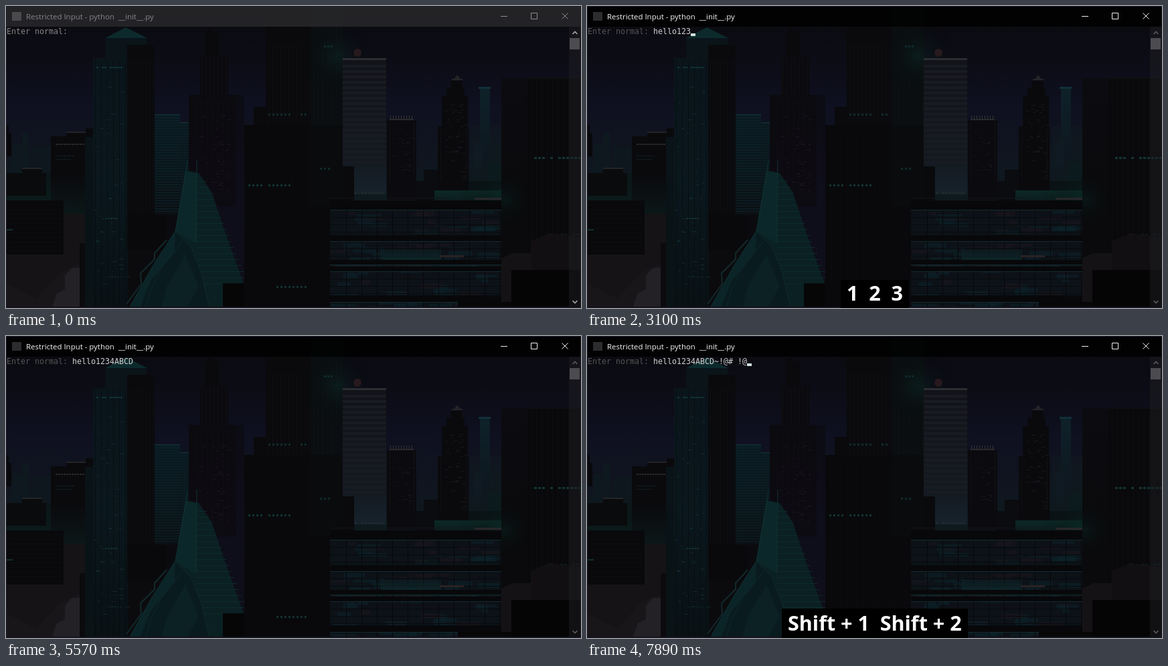
These frames come from a looping animation (859x452 px, 8 s). An HTML page with a canvas:

```html
<!DOCTYPE html>
<html lang="en">
<head>
<meta charset="utf-8">
<title>Restricted Input</title>
<style>
  html, body { margin: 0; width: 859px; height: 452px; overflow: hidden; background: #0b0b0e; }
  #stage { position: relative; width: 859px; height: 452px; overflow: hidden; }
  #stage > * { position: absolute; }
  canvas { left: 0; top: 0; }
  #bar { left: 0; top: 0; width: 859px; height: 31px; background: rgba(45, 45, 48, .72); }
  #title { left: 30px; top: 6px; font: 11.45px/20px "Open Sans", "Noto Sans", sans-serif; color: #858587; white-space: pre; }
  #icon { left: 9px; top: 9px; width: 14px; height: 13px; background: #4a4a4c; }
  svg { left: 0; top: 0; fill: none; }
  #buttons { stroke: #8c8c8e; }
  #arrows { stroke: #a4a4a6; stroke-width: 1.7; }
  #line { left: 1px; top: 31px; font: 11.63px/14px "DejaVu Sans Mono", "Noto Sans Mono", monospace; color: #868686; white-space: pre; }
  #typed { color: #cfcfcf; }
  #cursor { top: 41px; width: 7px; height: 4px; background: #d2e4e2; }
  #keys { bottom: 0; padding: 0 9px; background: #000; color: #fff; font: bold 30.5px "Open Sans", "Noto Sans", sans-serif; white-space: pre; }
  #edge { inset: 0; box-sizing: border-box; border: 1px solid #1c1b2c; border-right-color: #17171c; }
  .focus #bar { background: rgba(0, 0, 0, .8); }
  .focus #title { color: #f4f4f4; }
  .focus #icon { background: #2c2c2e; }
  .focus #buttons { stroke: #f0f0f0; }
  .focus #arrows { stroke: #58585a; }
  .focus #line { color: #555557; }
</style>
</head>
<body>
<div id="stage">
  <canvas id="city" width="859" height="452"></canvas>
  <div id="bar"></div>
  <div id="icon"></div>
  <div id="title">Restricted Input - python  __init__.py</div>
  <svg width="859" height="452">
    <path id="buttons" d="M739 15.5h10M784.5 10.5h9v9h-9zM830.5 10.5l9 9M839.5 10.5l-9 9"/>
    <path fill="#4c4b50" d="M842 48h15v17h-15z"/>
    <path id="arrows" d="M846.5 42l3.5-3.5 3.5 3.5M846.5 441l3.5 3.5 3.5-3.5"/>
  </svg>
  <div id="line">Enter normal: <span id="typed"></span></div>
  <div id="cursor"></div>
  <div id="edge"></div>
  <div id="keys"></div>
</div>
<script>
const $ = id => document.getElementById(id);
const ctx = $('city').getContext('2d');

let seed = 7;
const rnd = () => (seed = seed * 16807 % 2147483647) / 2147483647;

// All shapes take corner coordinates, not sizes.
function box(x0, y0, x1, y1, fill) {
  ctx.fillStyle = fill;
  ctx.fillRect(x0, y0, x1 - x0, y1 - y0);
}
function fade(x0, y0, x1, y1, ...colors) {
  const g = ctx.createLinearGradient(0, y0, 0, y1);
  colors.forEach((c, i) => g.addColorStop(i / (colors.length - 1), c));
  box(x0, y0, x1, y1, g);
}
function trace(pts) {
  ctx.beginPath();
  for (let i = 0; i < pts.length; i += 2) ctx.lineTo(pts[i], pts[i + 1]);
}
function poly(fill, ...pts) {
  trace(pts);
  ctx.fillStyle = fill;
  ctx.fill();
}
function stroke(color, width, ...pts) {
  trace(pts);
  ctx.strokeStyle = color;
  ctx.lineWidth = width;
  ctx.stroke();
}
function glow(x, y, r, color) {
  const g = ctx.createRadialGradient(x, y, 0, x, y, r);
  g.addColorStop(0, color);
  g.addColorStop(1, 'rgba(0,0,0,0)');
  box(x - r, y - r, x + r, y + r, g);
}
function columns(x0, y0, x1, y1, gap, color) {
  for (let x = x0; x < x1; x += gap) box(x, y0, x + 1, y1, color);
}
function rows(x0, y0, x1, y1, gap, color, h = 1) {
  for (let y = y0; y < y1; y += gap) box(x0, y, x1, y + h, color);
}
function dots(x0, x1, y, gap, color, w = 3, h = 3) {
  for (let x = x0; x < x1; x += gap) if (rnd() > .12) box(x, y, x + w, y + h, color);
}
function windows(x0, y0, x1, y1, count, color) {
  while (count--) {
    const x = Math.round(x0 + rnd() * (x1 - x0)), y = Math.round(y0 + rnd() * (y1 - y0));
    box(x, y, x + 2 + Math.round(rnd() * 4), y + 1, color);
  }
}

function sky() {
  fade(0, 0, 859, 300, '#0a0a0f', '#0c0c15', '#0f1020', '#10151f', '#0c1b1e');
  box(0, 300, 859, 452, '#0b0b0f');
  for (let i = 0; i < 28; i++) {
    const x = Math.round(rnd() * 859), y = Math.round(34 + rnd() * 140);
    box(x, y, x + 1, y + 1, '#1c1c2a');
  }
}

function leftSide() {
  box(10, 206, 22, 250, '#0e181f');
  box(24, 190, 34, 250, '#0e181f');
  box(40, 210, 66, 250, '#0e171e');
  fade(0, 250, 130, 312, '#0b1618', '#0b1c1b');
  box(0, 190, 8, 225, '#09090c');
  box(0, 178, 4, 190, '#09090c');
  box(0, 250, 60, 284, '#0a0b0d');
  box(24, 242, 54, 250, '#0a0b0d');
  box(24, 242, 54, 244, '#252527');
  fade(67, 195, 130, 311, '#0a0a0d', '#0a0a0d', '#0b1718');
  box(90, 188, 119, 195, '#0a0a0d');
  box(90, 188, 119, 190, '#222226');
  box(119, 183, 131, 250, '#0a0a0d');
  dots(74, 126, 206, 4, '#29292a', 3, 2);
  dots(74, 102, 224, 4, '#102224', 3, 1);
  dots(74, 102, 229, 4, '#102224', 3, 1);
  box(0, 311, 240, 452, '#0d0c0e');
  poly('#151315', 0, 345, 40, 350, 86, 311, 125, 311, 125, 452, 0, 452);
  poly('#19161a', 0, 415, 45, 438, 82, 398, 112, 386, 112, 452, 0, 452);
  poly('#232126', 68, 452, 76, 430, 88, 424, 88, 404, 98, 392, 110, 392, 110, 452);
  box(0, 291, 86, 372, '#09090b');
  rows(4, 297, 82, 368, 7, '#0d0d10');
  box(0, 334, 10, 336, '#12302f');
  box(110, 355, 240, 452, '#0b0b0e');
}

function tealTower() {
  fade(118, 196, 182, 452, '#0a1318', '#091215', '#0a1316');
  fade(130, 78, 182, 452, '#0a151b', '#0a171d', '#091114');
  box(148, 48, 210, 80, '#0a1419');
  poly('#0c2a2c', 179, 32, 211, 48, 148, 48);
  box(181, 58, 222, 311, '#0a0a0d');
  box(181, 311, 240, 365, '#09090b');
  columns(184, 80, 222, 309, 5, '#0d0e11');
  columns(133, 80, 180, 452, 9, 'rgba(5,8,10,.5)');
  dots(135, 174, 91, 4, '#11363a', 3, 2);
  windows(132, 120, 174, 420, 42, '#11292e');
  dots(148, 168, 317, 4, '#11302f', 3, 2);
  dots(150, 184, 405, 4, '#102728', 3, 1);
}

function middleTowers() {
  fade(222, 162, 260, 312, '#0b1b22', '#0a171c', '#0b1013');
  fade(260, 174, 282, 312, '#0b1a20', '#0a1317');
  rows(222, 163, 260, 310, 4, '#0c222a');
  rows(261, 175, 282, 290, 4, '#0c2028');
  box(222, 162, 260, 163, '#123238');
  box(260, 174, 282, 175, '#123238');
  fade(282, 133, 356, 420, '#0c0c14', '#0e0d1a', '#0f0e1a');
  fade(273, 133, 343, 300, '#0b0a0e', '#0d0b12');
  box(290, 75, 332, 133, '#0b0a0e');
  box(297, 38, 318, 75, '#0a0a0d');
  box(300, 32, 308, 38, '#0a0a0d');
  columns(292, 77, 331, 133, 6, '#110f14');
  columns(284, 140, 340, 290, 8, '#0f0d13');
  windows(286, 150, 332, 280, 46, '#1a161e');
}

function sail() {
  poly('#0b2022', 268, 246, 288, 250, 308, 280, 326, 335, 356, 418, 356, 452, 184, 452, 220, 390, 253, 337);
  for (let y = 262; y < 416; y += 9) box(284, y, 294 + (y - 250) * .42, y + 1, '#0d2b2d');
  poly('#0c2729', 268, 246, 284, 250, 284, 356, 253, 337);
  poly('#0a1b1f', 253, 337, 276, 360, 292, 400, 304, 452, 184, 452, 216, 395);
  poly('#0b2427', 253, 337, 252, 368, 216, 412, 200, 452, 184, 452, 216, 395);
  poly('#0b2123', 268, 372, 240, 420, 232, 452, 270, 452, 288, 420);
  stroke('#0f3234', 1, 271, 232, 267, 260, 253, 337, 220, 388, 184, 452);
  stroke('#0f3234', 1, 285, 230, 284, 352);
  stroke('#0d2b2d', 1, 253, 337, 276, 360, 292, 400, 304, 452);
  stroke('#0d282a', 1, 264, 352, 232, 392, 216, 425, 208, 452);
  stroke('#12292b', 2, 180, 446, 202, 416, 201, 400, 222, 379, 222, 370, 240, 350);
  box(324, 415, 358, 452, '#060607');
}

function centralBlock() {
  box(455, 0, 503, 300, '#0b0e10');
  box(388, 0, 455, 180, '#0a0a0c');
  box(370, 151, 390, 180, '#0a0a0c');
  box(356, 178, 484, 452, '#09090b');
  box(455, 178, 520, 300, '#0a0b0d');
  columns(392, 55, 455, 178, 6, '#0d0d10');
  columns(364, 185, 484, 415, 8, '#0b0b0e');
  columns(459, 32, 503, 178, 7, '#0c1114');
  dots(392, 450, 161, 6, '#102b2a');
  dots(362, 432, 267, 6, '#123433');
  dots(457, 484, 242, 6, '#112a2a');
  dots(404, 450, 419, 6, '#113131');
  dots(475, 490, 59, 5, '#123034');
  glow(495, 75, 60, 'rgba(12,44,42,.45)');
}

function skyline() {
  fade(503, 78, 568, 282, '#121318', '#14171e', '#131c25');
  rows(503, 88, 568, 240, 8, '#191b22', 4);
  box(503, 78, 568, 81, '#2b2d31');
  box(503, 240, 520, 290, '#0a0a0d');
  fade(520, 240, 568, 282, '#141b23', '#16222a');
  dots(521, 566, 279, 5, '#252b30', 3, 2);
  ctx.fillStyle = '#27191d';
  ctx.beginPath();
  ctx.arc(525, 70, 6, 0, 7);
  ctx.fill();

  box(569, 171, 613, 290, '#0b0a0e');
  columns(574, 164, 609, 171, 4, '#343435');
  box(573, 169, 609, 171, '#29292b');
  windows(576, 182, 606, 255, 28, '#17131b');
  columns(573, 174, 611, 260, 36, '#121016');

  fade(694, 180, 740, 290, '#10161f', '#0f1b20');
  fade(708, 122, 723, 230, '#0e2129', '#0e171f');
  box(706, 121, 724, 124, '#12303a');
  box(700, 205, 712, 250, '#0f1a22');
  box(720, 234, 740, 276, '#0d1c1f');
  box(624, 245, 645, 295, '#0a0c10');
  box(612, 262, 624, 295, '#0a0c10');
  box(645, 180, 691, 290, '#0a0a0d');
  box(651, 135, 690, 181, '#0a0a0d');
  box(658, 122, 685, 136, '#0a0a0d');
  box(664, 112, 682, 122, '#0a0a0d');
  poly('#242428', 674, 103, 679, 110, 669, 110);
  box(666, 109, 682, 111, '#242428');
  windows(655, 145, 686, 260, 44, '#18161c');
  columns(649, 182, 690, 262, 38, '#111116');
  box(691, 262, 740, 290, '#0b1215');
  fade(640, 276, 740, 292, '#0c2927', '#0c1c1c');
  glow(735, 285, 60, 'rgba(10,48,42,.35)');
}

function rightSide() {
  box(740, 150, 784, 452, '#0a0a0c');
  fade(740, 108, 784, 300, '#0b0b10', '#0a0a0c');
  box(779, 108, 859, 452, '#09090b');
  columns(784, 112, 858, 395, 8, '#0d0d10');
  box(779, 107, 859, 109, '#0f0f13');
  dots(789, 858, 226, 6, '#133433', 4, 3);
  dots(810, 858, 341, 6, '#0e1c1c', 4, 2);
  glow(745, 290, 44, 'rgba(10,45,40,.35)');
  poly('#141214', 740, 378, 756, 370, 784, 370, 784, 395, 756, 395, 756, 443, 740, 443);
  poly('rgba(24,20,22,.55)', 784, 395, 784, 352, 812, 340, 859, 346, 859, 395);
}

function band(top, end) {
  fade(484, top, 740, end, '#0d1117', '#0c1318');
  for (let n = 0; n < 22; n++) {
    const x = 484 + rnd() * 230, y = top + rnd() * (end - top - 2);
    const w = 8 + rnd() * 34, h = Math.min(1 + rnd() * 8, end - y);
    box(x, y, Math.min(x + w, 740), y + h, rnd() > .35 ? 'rgba(13,34,40,.6)' : 'rgba(28,22,30,.5)');
  }
  columns(508, top, 740, end, 23, '#07070a');
  rows(484, top + 11, 740, end, 11, '#08090c');
  box(484, top, 740, top + 1, '#122b2f');
}

function frontBlock() {
  box(484, 291, 740, 452, '#08080a');
  box(484, 287, 656, 288, '#151518');
  box(700, 287, 740, 290, '#29262a');
  band(305, 343);
  band(352, 380);
  band(387, 390);
  band(397, 433);
  band(443, 452);
  fade(560, 364, 650, 380, 'rgba(14,40,44,.3)', 'rgba(14,44,46,.7)');
  box(648, 373, 684, 376, '#2a2224');
  box(675, 443, 756, 452, '#070708');
  box(755, 395, 859, 452, '#050506');
}

function rim() {
  box(841, 31, 859, 452, 'rgba(30,30,34,.5)');
  box(0, 450, 859, 452, '#120d18');
}

[sky, leftSide, tealTower, middleTowers, sail, centralBlock, skyline, rightSide, frontBlock, rim].forEach(draw => draw());

const LOOP = 8000, FOCUS = 360;
const TEXT = 'hello1234ABCD~!@# !@';

// When each character is typed, when its caption leaves, when the cursor toggles.
const TYPED = [1120, 1300, 1480, 1720, 2080, 2570, 2680, 2920, 3160, 3930, 4370, 4590, 4810, 5700, 5940, 6200, 6440, 7220, 7550, 7770];
const GONE = [1720, 1960, 2460, 2460, 2800, 3310, 3490, 3730, 3830, 4700, 5130, 5350, 5570, 6440, 6720, 6910, 7150, 7890];
const BLINK = [800, 1480, 1960, 2080, 2680, 3310, 3730, 5130, 5700, 5830, 7220, 7660, 7770];
const passed = (times, t) => times.filter(x => x <= t).length;

const BASE = { '~': '`', '!': '1', '@': '2', '#': '3' };
function label(c) {
  if (c === ' ') return 'Space';
  return /[A-Z~!@#]/.test(c) ? 'Shift + ' + (BASE[c] || c) : c;
}

// The caption box grows with the height of its glyphs.
function metrics(s) {
  if (s.includes('Space')) return [50, 17];
  if (/[hl]|Shift/.test(s)) return [44, 11];
  return /\d/.test(s) ? [42, 11] : [40, 13];
}

let caption;
function showKeys(chars) {
  if (chars === caption) return;
  caption = chars;
  const el = $('keys'), s = [...chars].map(label).join('  ');
  el.hidden = !s;
  if (!s) return;
  const [height, base] = metrics(s);
  el.textContent = s;
  el.style.height = height + 'px';
  el.style.lineHeight = 2 * (height - base - 11.83) + 'px';
  el.style.left = Math.round(430.4 - el.offsetWidth / 2) + 'px';
}

function tick() {
  const t = performance.now() % LOOP;
  const count = passed(TYPED, t);
  $('stage').classList.toggle('focus', t >= FOCUS);
  $('typed').textContent = TEXT.slice(0, count);
  $('cursor').style.left = 99 + 7 * count + 'px';
  $('cursor').hidden = passed(BLINK, t) % 2 === 0;
  showKeys(TEXT.slice(passed(GONE, t), count));
  requestAnimationFrame(tick);
}
tick();
</script>
</body>
</html>
```
